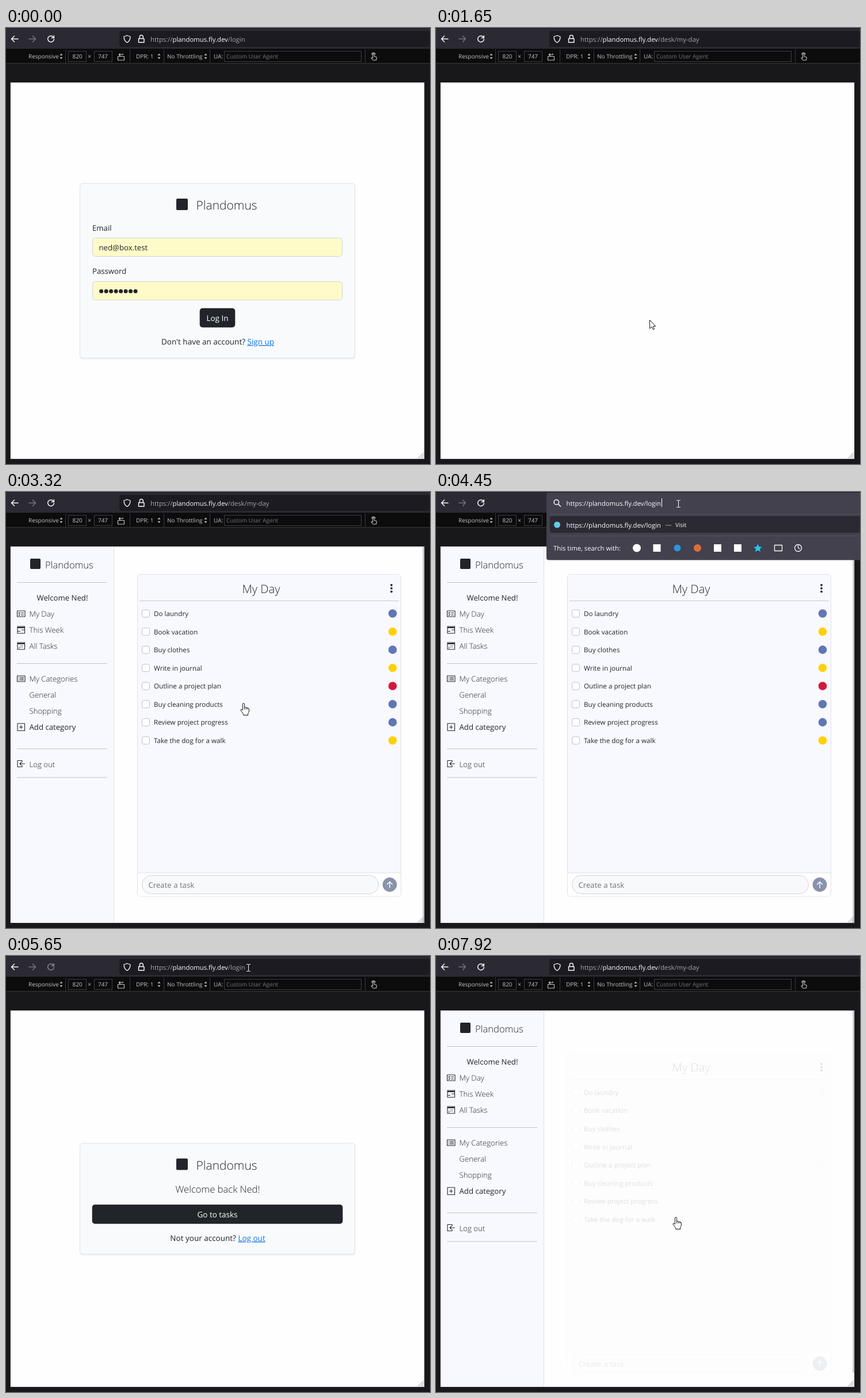
Write an HTML page that moves like this. It is 737 px wide and 759 px high and loops after 7990 ms.

```html
<!DOCTYPE html>
<html lang="en">
<head>
<meta charset="utf-8">
<title>Task desk</title>
<style>
  html, body { margin: 0; width: 100%; height: 100%; overflow: hidden; background: #18181a; }
  svg { display: block; width: 737px; height: 759px; font-family: "Open Sans", "Noto Sans", sans-serif; }
  text { white-space: pre; text-rendering: geometricPrecision; }
  .line { fill: none; stroke-linecap: round; stroke-linejoin: round; }
</style>
</head>
<body>
<svg id="stage" viewBox="0 0 737 759"></svg>
<script>
const LOOP = 7990, STEP = 66.8, FIRST = 770;
const INK = '#212529', EDGE = '#dee2e6', PALE = '#fbfbfe';
const BRAND = 'Plandomus', HOST = 'plandomus.fly.dev';

const text = (x, y, s, size = 13.2, fill = INK, more = '') =>
  `<text x="${x}" y="${y}" font-size="${size}" fill="${fill}" ${more}>${s}</text>`;
const light = (x, y, s, size = 13.2, more = '') => text(x, y, s, size, INK, 'font-weight="300" ' + more);
const box = (x, y, w, h, fill, more = '') =>
  `<rect x="${x}" y="${y}" width="${w}" height="${h}" fill="${fill}" ${more}/>`;
const dot = (x, y, r, fill, more = '') => `<circle cx="${x}" cy="${y}" r="${r}" fill="${fill}" ${more}/>`;
const line = (d, stroke, width = 1, more = '') =>
  `<path class="line" d="${d}" stroke="${stroke}" stroke-width="${width}" ${more}/>`;
const group = (id, body, more = '') => `<g id="${id}" ${more}>${body}</g>`;
const list = (n, f) => Array.from({ length: n }, (_, i) => f(i)).join('');
const MID = 'text-anchor="middle"';

function toolbar() {
  return box(0, 0, 737, 36, '#2b2a33') + box(0, 0, 737, 1, '#1c1b22') +
    line('M21 19H9.5M14.5 14L9.5 19 14.5 24', PALE, 1.5) +
    line('M40 19H51.5M46.5 14L51.5 19 46.5 24', '#77767f', 1.5) +
    group('reload', line('M82.2 15.6A5.4 5.4 0 1 0 83.4 19.6M83.3 13.4V17.3H79.3', PALE, 1.5)) +
    group('bar',
      box(197, 5, 548, 28, '#1c1b22', 'id="field" rx="4"') +
      box(251, 11, 212, 17, '#3b6cc4', 'id="selection"') +
      line('M210.5 13L216 15C216 20 214 23.5 210.5 25.5 207 23.5 205 20 205 15Z', PALE, 1.3) +
      line('M230.5 18.5H240V25H230.5ZM232.3 18.5V15.5A3 3 0 0 1 238.3 15.5V18.5', PALE, 1.4) +
      `<text x="251" y="23.5" font-size="11.3" fill="#a3a2ab">https://<tspan fill="${PALE}">${HOST}</tspan><tspan id="path"></tspan></text>`);
}

function deviceBar() {
  const label = (x, s, fill = '#c4c4c8') => text(x, 53, s, 10, fill);
  const arrows = x => `<path d="M${x - 2.5} 47.5L${x} 44.5 ${x + 2.5} 47.5ZM${x - 2.5} 51L${x} 54 ${x + 2.5} 51Z" fill="#c4c4c8"/>`;
  const entry = (x, w) => box(x + .5, 40.5, w, 18, '#0c0c0d', 'stroke="#3f3f44"');
  return box(0, 36, 737, 26, '#0c0c0d') + box(0, 61, 737, 1, '#38383d') +
    [103, 215, 274, 354, 624].map(x => box(x, 37, 1, 24, '#38383d')).join('') +
    label(39, 'Responsive') + arrows(96) +
    entry(108, 31) + text(124, 53, '820', 10, '#c4c4c8', MID) + text(145, 53, '×', 10, '#c4c4c8', MID) +
    entry(153, 31) + text(168.5, 53, '747', 10, '#c4c4c8', MID) +
    line('M194.5 49.5H205.5V56H194.5ZM196.5 46.5H203V44.5M198.5 44.5L196.2 46.5 198.5 48.5', '#c4c4c8', 1.1) +
    label(226, 'DPR: 1') + arrows(266) + label(280, 'No Throttling') + arrows(347) +
    label(361, 'UA:') + entry(379, 238) + label(383, 'Custom User Agent', '#737378') +
    line('M637.5 52V45.5A1.3 1.3 0 0 1 640 45.5V49.5L643 50.2Q644.5 50.6 644.3 52L643.6 56H638L635 52.5Q636 51 637.5 52M635.8 46A3 3 0 0 1 641.8 46', '#c4c4c8', 1.1);
}

function dropdown() {
  const address = `https://${HOST}/login`;
  const white = x => box(x - 6.5, 91, 13, 13, '#fff');
  return box(192, 1, 552, 117.5, '#42414d', 'rx="4"') +
    box(198, 38, 539, 1, '#52525e') + box(198, 42, 545, 29, '#2b2a33', 'rx="3"') + box(198, 76, 539, 1, '#52525e') +
    line('M212.8 21.4L216.5 25', PALE, 1.6) + dot(209.3, 17.8, 4.3, 'none', `stroke="${PALE}" stroke-width="1.5"`) +
    text(226.5, 23.5, address, 11.3, PALE, 'id="typed"') + box(394, 11, 1, 15, '#fff', 'id="caret"') +
    dot(210.5, 57, 5.5, '#61c9e8') + text(226.5, 61.5, address, 11.3, PALE) +
    text(398.5, 61, '—', 11.3, '#b5b4bd') + text(416, 61, 'Visit', 10, PALE) +
    text(204, 102, 'This time, search with:', 11.3, PALE) +
    dot(349, 97.5, 7, '#fff') + white(384) + dot(419.5, 97.5, 6, '#2f93dd') + dot(454.5, 97.5, 6.5, '#de6d3c') +
    white(489.5) + white(524.5) +
    '<path d="M559.5 90.5L561.6 95.2 566.7 95.7 562.9 99.1 564 104.1 559.5 101.5 555 104.1 556.1 99.1 552.3 95.7 557.4 95.2Z" fill="#20ccf3"/>' +
    line('M588.5 92.5H601.5V102.5H588.5Z', PALE, 1.3) +
    dot(629.5, 97.5, 6, 'none', `stroke="${PALE}" stroke-width="1.3"`) + line('M629.5 93.5V97.5L632.5 99', PALE, 1.3);
}

const card = (y, h) =>
  box(128, y + 2, 479, h, '#000', 'rx="5" opacity=".05"') +
  box(128.5, y + .5, 478, h - 1, '#f8fafc', `rx="5" stroke="${EDGE}"`) +
  box(296, y + 27, 20, 20, INK, 'rx="2"') + light(330.5, y + 46, BRAND, 21);
const button = (id, x, y, w, label) =>
  box(x - .3, y - .3, w + .6, 33.6, INK, `rx="5" id="${id}"`) + text(367.5, y + 21.7, label, 13.5, '#fff', MID);
const question = (y, ask, link) =>
  text(368, y, `${ask} <tspan fill="#0d78ee" text-decoration="underline">${link}</tspan>`, 13.5, INK, MID);

function loginCard() {
  const input = y => box(150.5, y + .5, 434, 32, '#fffbc8', 'rx="5" stroke="#ced4da"');
  return card(270, 305) + text(150, 353, 'Email') + input(365) + text(161.5, 387, 'ned@box.test') +
    text(150, 428, 'Password') + input(441) + list(8, i => dot(165.6 + i * 8.5, 458.2, 3.5, INK)) +
    button('logIn', 337, 488, 61, 'Log In') + question(551, "Don't have an account?", 'Sign up');
}

function welcomeCard() {
  return card(325.5, 194) + light(368, 412, 'Welcome back Ned!', 16.6, MID) +
    button('goTasks', 150, 433, 435, 'Go to tasks') + question(496, 'Not your account?', 'Log out');
}

function sidebar() {
  const icon = (y, d) => line(d, INK, 1.1, `transform="translate(19.5 ${y})"`);
  const frame = 'M0 1.5H13.5V11.5H0Z';
  const calendar = 'M.5 .5H13V12.5H.5ZM.5 3H13M.5 2H13';
  return box(8, 95, 179, 655, '#f8f9fe') + box(187, 95, 1, 655, EDGE) +
    box(42, 116, 18, 18, INK, 'rx="2"') + light(68, 132.5, BRAND, 16.6) +
    [157, 298, 446.5, 496.5].map(y => box(19, y, 157, 1, '#c0c3c9')).join('') +
    text(98, 188.5, 'Welcome Ned!', 13.2, INK, MID) +
    [['My Day', 217], ['This Week', 245], ['All Tasks', 273], ['My Categories', 330],
      ['General', 358], ['Shopping', 386], ['Log out', 478.5]].map(([s, y]) => light(40.5, y, s)).join('') +
    text(40.5, 414, 'Add category') +
    icon(205.5, frame + 'M2.5 5L3.3 5.8 4.8 4M2.5 8.5L3.3 9.3 4.8 7.6M7 5H11M7 8.5H11') +
    icon(233.5, calendar + 'M8 6.5H13M.5 9H5') +
    icon(261.5, calendar + 'M6.5 6H7M9 6H9.5M3 8.5H3.5M5.5 8.5H6M8 8.5H8.5M3 10.5H3.5') +
    icon(318.5, frame + 'M2.5 4.3H3M2.5 6.5H3M2.5 8.7H3M5 4.3H11M5 6.5H11M5 8.7H11') +
    icon(402.5, 'M.5 .5H13V13H.5ZM6.75 4V9.5M4 6.75H9.5') +
    icon(466.5, 'M8.5 3.5V1H.5V12H8.5V9.5M13 6.5H4.5M7 4L4.5 6.5 7 9');
}

function taskCard() {
  const tasks = ['Do laundry', 'Book vacation', 'Buy clothes', 'Write in journal', 'Outline a project plan',
    'Buy cleaning products', 'Review project progress', 'Take the dog for a walk'];
  const tones = { b: '#6275b4', y: '#ffd100', r: '#d6173c' };
  const rowY = i => 211.5 + i * 31.57;
  return box(228.5, 143.5, 458, 560.5, '#f8f9ff', `rx="5" stroke="${EDGE}"`) +
    box(229, 663, 457, 40.5, '#fefefe', 'rx="4"') + box(229, 662.5, 457, 1, EDGE) +
    light(443.5, 175.5, 'My Day', 20.2, MID) + box(232, 189, 451, 1, '#c3c6cc') +
    list(3, i => dot(670, 162 + i * 5.7, 1.9, INK)) +
    tasks.map((s, i) => box(236.5, rowY(i) - 6.5, 13, 13, '#fff', 'rx="3" stroke="#bcc0c6"') +
      text(257, rowY(i) + 4.5, s, 11.65)).join('') +
    group('marks', [...'bybyrbby'].map((k, i) => dot(672, rowY(i), 7.3, tones[k])).join('')) +
    box(236.5, 667.5, 411, 32, '#f8f9fa', 'rx="16" stroke="#ced4da"') + text(247.5, 689, 'Create a task', 13.2, '#6c757d') +
    dot(667, 683.5, 12.4, '#8a92ac') + line('M667 689V678.5M662.5 683L667 678.5 671.5 683', '#fff', 1.4);
}

const cursors = {
  arrow: '<path d="M.5 .5V15.2L4 12 6.5 17 8.6 16 6.3 11.2H10.8Z" fill="#fff" stroke="#111"/>',
  hand: '<path d="M-1.6 12V1.4A1.6 1.6 0 0 1 1.6 1.4V7Q3.2 5.8 4.4 7.4 6 6.6 7 8.2 9 7.6 9.4 9.8V13Q9.4 15.5 7.6 17.5V20.5H-.3V18.5L-4.8 12.5Q-5.6 10.8-4 10.4-2.6 10.4-1.6 12ZM1.6 7V10.5M4.4 7.5V10.5M7 8.2V10.5" fill="#fff" stroke="#111"/>',
  beam: line('M-2.5 -6.5H-.5M1.5 -6.5H3.5M.5 -6V5M-2.5 5.5H-.5M1.5 5.5H3.5', '#fff')
};

const stage = document.getElementById('stage');
stage.innerHTML = box(0, 0, 737, 759, '#18181a') +
  box(7.5, 94.5, 720, 656, '#fefefe', 'stroke="#38383d"') +
  group('login', loginCard()) + group('welcome', welcomeCard()) +
  group('desk', sidebar() + group('tasks', taskCard()) + box(724.5, 95, 2, 655, '#b9babd', 'id="scroll"')) +
  line('M716.5 749L726 739.5M720.5 749L726 743.5M724 749L726 747', '#85858c') +
  toolbar() + deviceBar() + group('suggest', dropdown()) +
  group('pointer', Object.entries(cursors).map(([id, d]) => group(id, d)).join(''));

const el = {};
stage.querySelectorAll('[id]').forEach(n => el[n.id] = n);
const show = (n, on) => n.style.display = on ? '' : 'none';
const fade = (n, a) => { n.style.opacity = a; show(n, a > 0); };

// Rows are [time, value, value...]; values are linear between rows.
function sample(rows, t) {
  const next = rows.findIndex(r => r[0] > t);
  if (next < 0) return rows[rows.length - 1].slice(1);
  if (next === 0) return rows[0].slice(1);
  const a = rows[next - 1], b = rows[next], k = (t - a[0]) / (b[0] - a[0]);
  return a.slice(1).map((v, i) => v + (b[i + 1] - v) * k);
}

const travel = [
  [770, 640, 742], [900, 560, 690], [1040, 460, 600], [1170, 392, 528], [1300, 371, 508],
  [2850, 371, 508], [2970, 402, 516], [3050, 402, 516], [3110, 405, 527], [3180, 405, 490],
  [3308, 413, 368], [3520, 444, 190], [3640, 448, 110], [3840, 421, 20.5],
  [6460, 421, 20.5], [6720, 430, 140], [7000, 425, 380], [7180, 417, 455]
];
const entrance = [[0, 44, 0], [67, 26, .13], [134, 12, .38], [190, 4, .6], [330, 0, .82], [730, 0, 1]];
const loginFade = [[1500, 1], [1630, 0]];
const welcomeFade = [[5510, 0], [5640, 1], [7630, 1], [7770, 0]];
const within = (t, a, b) => t >= a && t < b;

function render(now) {
  const t = FIRST + Math.floor((now - FIRST + 6) / STEP) * STEP;
  const [x, y] = sample(travel, t);
  const onDesk = within(t, 1766, 5390) || t >= 7775;
  const onLogin = t < 1500, onWelcome = within(t, 5510, 7640);

  fade(el.login, sample(loginFade, t)[0]);
  fade(el.welcome, sample(welcomeFade, t)[0]);

  show(el.desk, onDesk);
  const [drop, alpha] = sample(entrance, t - (t < 6000 ? 1850 : 7850));
  el.tasks.setAttribute('transform', `translate(0 ${drop})`);
  fade(el.tasks, alpha);
  fade(el.marks, alpha ** 1.8);
  el.scroll.setAttribute('height', 655 * 655 / (655 + drop));

  const focused = within(t, 3970, 4440);
  el.path.textContent = within(t, 1500, 5320) || t >= 7640 ? '/desk/my-day' : '/login';
  el.field.setAttribute('fill', focused ? '#42414d' : '#1c1b22');
  show(el.selection, within(t, 4040, 4440));
  show(el.suggest, within(t, 4440, 5320));
  show(el.caret, t < 5175);
  el.caret.setAttribute('x', Math.round(226.5 + typedWidth + .5));
  el.reload.style.opacity = within(t, 5320, 6110) ? .45 : 1;

  const overLogin = onLogin && within(x, 337, 398) && within(y, 488, 521);
  const overGo = onWelcome && within(x, 150, 585) && within(y, 433, 466);
  const overTask = onDesk && t > 3000 && within(x, 232, 683) && within(y, 198, 449);
  el.logIn.setAttribute('fill', overLogin ? '#424649' : INK);
  el.goTasks.setAttribute('fill', overGo ? '#424649' : INK);

  const kind = y < 34 ? 'beam' : overLogin || overGo || overTask || t >= 7640 ? 'hand' : 'arrow';
  for (const k in cursors) show(el[k], k === kind);
  show(el.pointer, t >= FIRST - 1);
  el.pointer.setAttribute('transform', `translate(${Math.round(x)} ${Math.round(y)})`);
}

const typedWidth = el.typed.getComputedTextLength();
const start = performance.now();
function tick() {
  render((performance.now() - start) % LOOP);
  requestAnimationFrame(tick);
}
tick();
</script>
</body>
</html>
```
